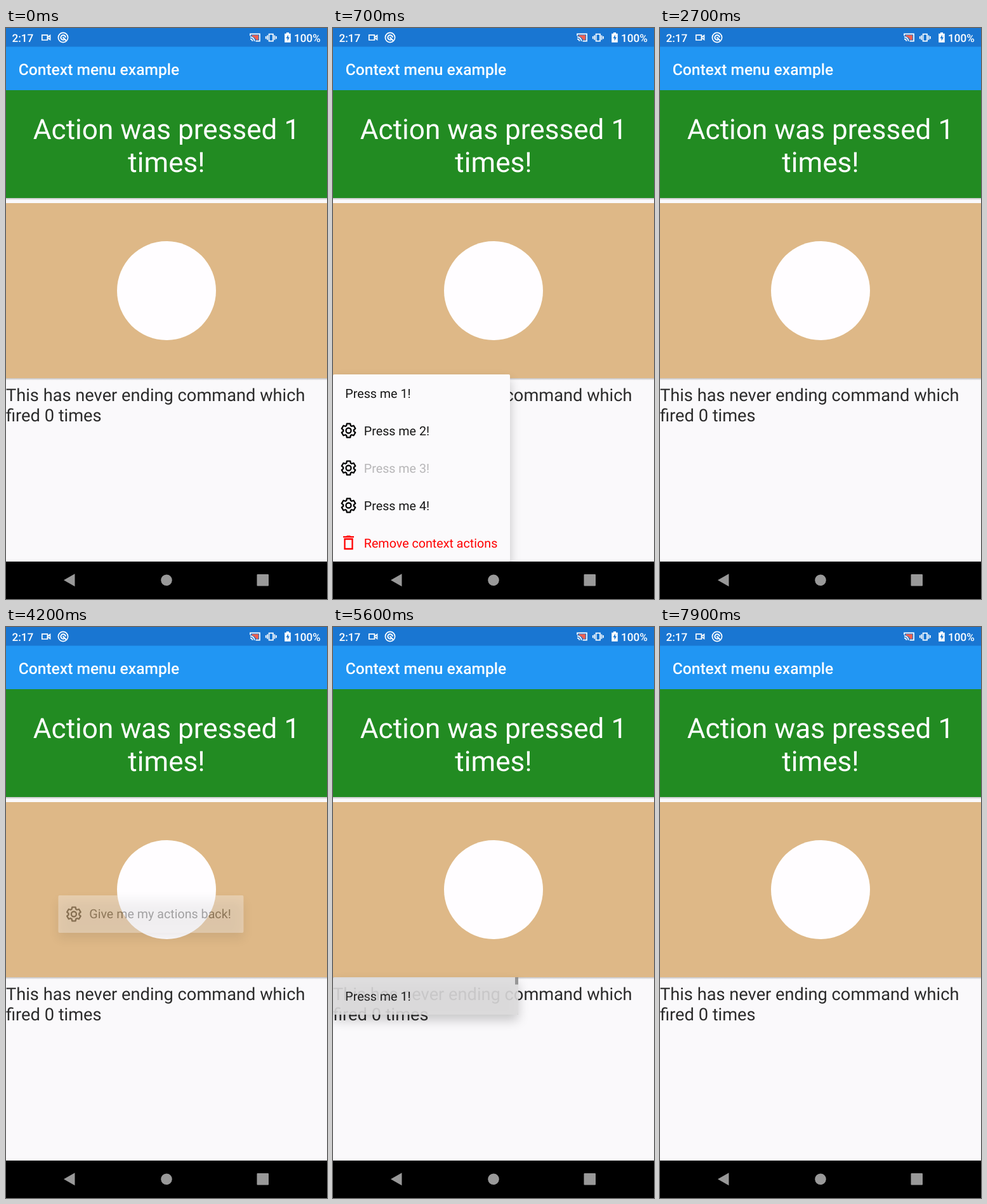
Write an HTML page that moves like this. It is 506 px wide and 900 px high and loops after 8000 ms.

```html
<!DOCTYPE html>
<html lang="en">
<head>
<meta charset="utf-8">
<title>Context menu example</title>
<style>
  html, body { margin: 0; width: 100%; height: 100%; overflow: hidden; background: #faf9fb; }
  svg { display: block; width: 100vw; height: 100vh; }
  text { font-family: Roboto, sans-serif; text-rendering: geometricPrecision; white-space: pre; }
  .status { font-size: 17.2px; font-weight: 500; fill: #fff; }
  .title { font-size: 24.6px; font-weight: 500; fill: #fff; }
  .big { font-size: 44.1px; fill: #fff; text-anchor: middle; }
  .label { font-size: 27.24px; fill: #2b2b2b; }
  .item { font-size: 19.7px; }
  .line { fill: none; stroke: #fff; stroke-width: 1.7; }
</style>
</head>
<body>
<svg viewBox="0 0 506 900">
  <defs>
    <filter id="blur" x="-20%" y="-80%" width="140%" height="260%"><feGaussianBlur stdDeviation="8.5"/></filter>
    <linearGradient id="edge" x2="0" y2="1">
      <stop stop-color="#000" stop-opacity=".22"/><stop offset="1" stop-color="#000" stop-opacity="0"/>
    </linearGradient>
  </defs>
  <rect width="506" height="900" fill="#faf9fb"/>
  <rect width="506" height="98" fill="#2196f3"/>
  <rect width="506" height="29.5" fill="#1976d2"/>

  <text class="status" x="9.5" y="21.5">2:17</text>
  <g class="line">
    <path d="M56.8 11.2h8.6v7.8h-8.6zM65.5 14.8l4-3v6.6l-4-3"/>
    <circle cx="90" cy="15" r="7.6"/>
    <path d="M91.8 18.2a3.7 3.7 0 1 1 2-3.3M89.5 14.5l5.5 5.5" stroke-width="2"/>
    <path d="M385 12.2V9.3H400V20.7H393.5M385 14.2a6.6 6.6 0 0 1 6.6 6.6M385 17.4a3.4 3.4 0 0 1 3.4 3.4"/>
    <path d="M414.6 9.6h6.4v11h-6.4zM412.2 11.5v7.2M409.7 13v4.2M423.4 11.5v7.2M425.9 13v4.2"/>
  </g>
  <path d="M387.5 11.3H398V18.7H394q-1.5-4.500-6.500-5.500z" fill="#f0604f"/>
  <path d="M442 7h4v1.7h2.8v14h-9.6v-14h2.8z" fill="#fff"/>
  <path d="M444.8 10.5l-3.3 5.8h2.2v4.2l3.3-6h-2.2z" fill="#1976d2"/>
  <text class="status" x="454" y="21.5">100%</text>
  <text class="title" x="19.7" y="73.6">Context menu example</text>

  <rect y="98" width="506" height="170" fill="#228b22"/>
  <rect y="268" width="506" height="3.5" fill="url(#edge)"/>
  <text class="big" x="253" y="175">Action was pressed 1</text>
  <text class="big" x="253" y="227">times!</text>
  <rect y="276" width="506" height="276" fill="#deb887"/>
  <rect y="552" width="506" height="3.5" fill="url(#edge)"/>
  <circle cx="253" cy="414" r="78" fill="#fffdff"/>
  <text class="label" x="0" y="588.3">This has never ending command which</text>
  <text class="label" x="0" y="620">fired 0 times</text>

  <g id="menus"></g>

  <rect y="841" width="506" height="59"/>
  <g fill="#999">
    <path d="M91 870.3L108.500 860.300V880.300Z"/>
    <circle cx="253" cy="870.3" r="8.8"/>
    <rect x="395.500" y="861" width="18.500" height="18.500" rx="1"/>
  </g>
</svg>
<script>
const LOOP = 8000, ROW = 59, ANCHOR = { x: 253, y: 414 };
const clamp = v => Math.min(1, Math.max(0, v));
const ramp = (t, start, length) => clamp((t - start) / length);

// cubic-bezier(.2, 0, 0, 1)
function ease(x) {
  let lo = 0, hi = 1;
  for (let i = 0; i < 24; i++) {
    const u = (lo + hi) / 2;
    if (0.6 * u * (1 - u) ** 2 + u ** 3 < x) lo = u; else hi = u;
  }
  return lo * lo * (3 - 2 * lo);
}

function gear(cy) {
  const pts = [];
  for (let k = 0; k < 6; k++) {
    for (const [a, r] of [[-23, 8.4], [-14, 11.2], [14, 11.2], [23, 8.4]]) {
      const rad = (k * 60 - 90 + a) * Math.PI / 180;
      pts.push((24.5 + r * Math.cos(rad)).toFixed(2) + ',' + (cy + r * Math.sin(rad)).toFixed(2));
    }
  }
  return `<g fill="none" stroke="#000" stroke-width="2.3" stroke-linejoin="round">
    <polygon points="${pts.join(' ')}"/><circle cx="24.5" cy="${cy}" r="4"/></g>`;
}

const bin = cy => `<g fill="none" stroke="#f00" stroke-width="2.3">
  <path d="M18.500 ${cy - 6}V${cy + 9.5}H30.500V${cy - 6}ZM16 ${cy - 9.300}H33M21.500 ${cy - 10.300}H27.500"/></g>`;

function item(text, row, icon, color = '#161616') {
  const mid = row * ROW + 29.5;
  return (icon ? icon(mid) : '') +
    `<text class="item" x="${icon ? 48.8 : 19.3}" y="${mid + 7}" fill="${color}">${text}</text>`;
}

const menus = [
  {
    y: 546, w: 279, h: 5 * ROW, open: 150, press: 1590, close: 1770, hit: 4,
    before: item('Press me 1!', 0) + item('Press me 2!', 1, gear) +
      item('Press me 3!', 2, gear, '#b7b6b8') + item('Press me 4!', 3, gear) +
      item('Remove context actions', 4, bin, '#f00'),
    after: item('Give me my actions ba…', 0, gear)
  },
  {
    y: 552, w: 292, h: ROW, open: 4150, press: 5290, close: 5580, hit: 0,
    before: item('Give me my actions back!', 0, gear),
    after: item('Press me 1!', 0) + '<rect x="287" width="5" height="11.5" fill="#8c8c8c"/>'
  }
];

const layer = document.getElementById('menus');
for (const m of menus) {
  const g = document.createElementNS('http://www.w3.org/2000/svg', 'g');
  g.innerHTML = `<rect y="9" width="${m.w}" height="${m.h}" rx="2" filter="url(#blur)"/>
    <g><rect width="${m.w}" height="${m.h}" rx="2" fill="#fbfafc"/>
    <rect y="${m.hit * ROW}" width="${m.w}" height="${ROW}"/>
    <g>${m.before}</g><g>${m.after}</g></g>`;
  layer.append(g);
  m.node = g;
  [m.shadow, m.card] = g.children;
  [, m.ripple, m.first, m.second] = m.card.children;
}

function draw(t) {
  for (const m of menus) {
    const alpha = ramp(t, m.open, 150) * (1 - ramp(t, m.close, 190));
    m.node.style.display = alpha > 0 ? '' : 'none';
    if (!alpha) continue;
    const left = 1 - ease(ramp(t, m.open, 430));
    const dx = (ANCHOR.x - m.w / 2) * left;
    const dy = (ANCHOR.y - m.y - m.h / 2) * left;
    m.node.setAttribute('transform', `translate(${dx.toFixed(2)} ${(m.y + dy).toFixed(2)})`);
    m.shadow.setAttribute('opacity', 0.22 * alpha);
    m.card.setAttribute('opacity', alpha);
    m.ripple.setAttribute('opacity', 0.12 * ramp(t, m.press, 120));
    const swapped = t >= m.close;
    m.first.style.display = swapped ? 'none' : '';
    m.second.style.display = swapped ? '' : 'none';
  }
}

const begin = performance.now();
function tick() {
  draw((performance.now() - begin) % LOOP);
  requestAnimationFrame(tick);
}
tick();
</script>
</body>
</html>
```
